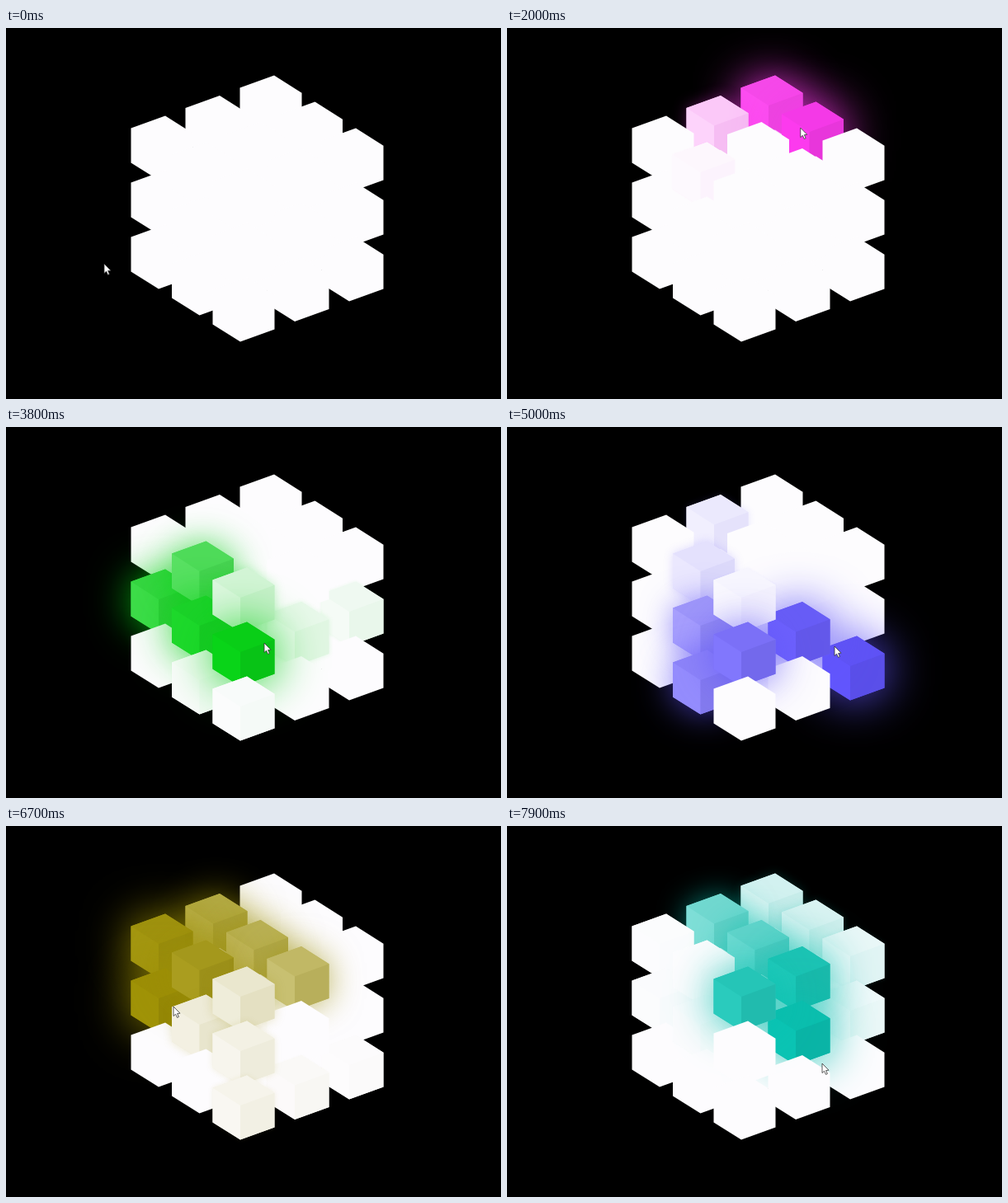
An HTML page with a canvas for the animation above (8 s loop, 600 by 450 pixels).

```html
<!DOCTYPE html>
<html lang="en">
<head>
<meta charset="utf-8">
<title>Glowing cubes</title>
<style>
  html, body { margin: 0; width: 100%; height: 100%; overflow: hidden; background: #000; }
  canvas { display: block; width: 600px; height: 450px; }
</style>
</head>
<body>
<canvas id="stage" width="600" height="450"></canvas>
<script>
const ctx = document.getElementById('stage').getContext('2d');
const LOOP = 8000, STEP = 100, FADE = 1500, GLOW = 58;
const WHITE = [253, 252, 254];

// Pointer stops: time of leaving, cube under the pointer, optional exact position.
const stops = [
  [0, '', 119, 286], [300, '', 142, 232], [430, '001'], [890, '100'],
  [1200, '010', 284, 113], [1400, '010', 289, 108], [1870, '020'], [2050, '120'],
  [2120, '210'], [2180, '211'], [2350, '212'], [2640, '202'], [2680, '102'],
  [2720, '201'], [2760, '211'], [2800, '221', 434, 240], [2820, '221'],
  [2900, '211'], [3080, '200'], [3525, '100'], [3590, '001'], [3680, '101'],
  [3800, '201', 313, 262], [3860, '201'], [3940, '200'],
  [4170, '010'], [4260, '100'], [4660, '101'], [4725, '102'], [4800, '201'],
  [4900, '211'], [5000, '222', 397, 266], [5450, '222'], [5600, '212'],
  [5780, '202'], [5850, '201'], [5950, '101'], [6010, '200'], [6370, '210'],
  [6410, '110'], [6450, '010'], [6570, '100'], [6630, '000'],
  [6700, '001', 203, 219], [6730, '101'], [6770, '200'], [6810, '211'],
  [6900, '221'], [7000, '220'], [7130, '120'], [7180, '020'], [7540, '010'],
  [7580, '110'], [7740, '200'], [7770, '210'], [7870, '211'],
  [7900, '', 382, 288], [8000, '212']
];

// Lightness of the glow colour around the hue circle.
const lightness = [[0, .54], [24, .45], [54, .32], [128, .43], [175, .39],
                   [224, .59], [246, .655], [300, .6], [360, .54]];

// Top vertex of cube (i, j, k): i to the front right, j to the back right, k down.
const apex = (i, j, k) => [193 + 49.5 * i + 66 * j, 107 + 32 * i - 24.5 * j + 66 * k];

const cubes = [];
for (let i = 0; i < 3; i++)
  for (let j = 2; j >= 0; j--)
    for (let k = 0; k < 3; k++)
      cubes.push({ id: `${i}${j}${k}`, at: apex(i, j, k) });

const path = stops.map(([t, id, x, y]) => {
  if (x === undefined) {
    const [ax, ay] = apex(...[...id].map(Number));
    x = ax - 5;
    y = ay + 40;
  }
  return { t, id, x, y };
});

const lerp = (a, b, u) => a + (b - a) * u;

function ease(x) {
  if (x >= 1) return 1;
  const bez = (p, q, s) => 3 * p * s * (1 - s) ** 2 + 3 * q * s * s * (1 - s) + s ** 3;
  let lo = 0, hi = 1;
  for (let n = 0; n < 16; n++) {
    const mid = (lo + hi) / 2;
    if (bez(.25, .25, mid) < x) lo = mid; else hi = mid;
  }
  return bez(.1, 1, lo);
}

function glowColor(t) {
  const hue = (104 + t * .1001) % 360;
  const n = lightness.findIndex(p => p[0] > hue);
  const [h0, l0] = lightness[n - 1], [h1, l1] = lightness[n];
  const l = lerp(l0, l1, (hue - h0) / (h1 - h0));
  const a = .92 * Math.min(l, 1 - l);
  return [0, 8, 4].map(c => {
    const m = (c + hue / 30) % 12;
    return 255 * (l - a * Math.max(-1, Math.min(m - 3, 9 - m, 1)));
  });
}

// How strongly a cube is lit: full under the pointer, then fading out.
function heat(id, t) {
  for (let n = path.length - 1; n > 0; n--) {
    const from = path[n - 1].t;
    if (path[n].id === id && from < t)
      return 1 - ease(Math.max(0, t - path[n].t) / FADE);
  }
  return 0;
}

function polygon(x, y, points, fill) {
  ctx.beginPath();
  for (const [px, py] of points) ctx.lineTo(x + px, y + py);
  ctx.closePath();
  ctx.fillStyle = fill;
  ctx.fill();
}

const T = [0, -.5], L = [-41.5, 14.6], C = [-8, 36], R = [33.5, 20.7];
const LB = [-41.5, 56.4], B = [-8, 77.6], RB = [33.5, 62.4];
const outline = [T, R, RB, B, LB, L];

// A higher power makes a face fade to white sooner.
const faces = [
  { points: [T, R, C, L], shade: .99, power: 1.15 },
  { points: [L, C, B, LB], shade: 1.02, power: 1.35 },
  { points: [C, R, RB, B], shade: .94, power: 1 }
];

function drawCube({ id, at: [x, y] }, t, glow) {
  const w = heat(id, t);
  const tint = (shade, power) =>
    `rgb(${WHITE.map((v, c) => Math.round(lerp(v, Math.min(255, glow[c] * shade), w ** power)))})`;
  if (w > .004) {
    ctx.shadowColor = `rgba(${glow.map(Math.round)},${w})`;
    ctx.shadowBlur = GLOW * w;
  }
  polygon(x, y, outline, tint(1, 1.15));
  ctx.shadowColor = 'transparent';
  ctx.shadowBlur = 0;
  if (w > .004)
    for (const f of faces) polygon(x, y, f.points, tint(f.shade, f.power));
}

const arrow = [[0, 0], [0, 11.5], [2.6, 9.2], [4.5, 13.4], [6.4, 12.5], [4.6, 8.5], [8, 8.2]];

function drawPointer(t) {
  const n = Math.max(1, path.findIndex(p => p.t >= t));
  const a = path[n - 1], b = path[n];
  const u = (t - a.t) / (b.t - a.t);
  polygon(lerp(a.x, b.x, u), lerp(a.y, b.y, u), arrow, '#fff');
  ctx.strokeStyle = '#333';
  ctx.lineWidth = .8;
  ctx.stroke();
}

function draw(t) {
  ctx.fillStyle = '#000';
  ctx.fillRect(0, 0, 600, 450);
  const glow = glowColor(t);
  for (const cube of cubes) drawCube(cube, t, glow);
  drawPointer(t);
}

const start = performance.now();
function tick() {
  const t = (performance.now() - start) % LOOP;
  draw(Math.floor(t / STEP) * STEP);
  requestAnimationFrame(tick);
}
tick();
</script>
</body>
</html>
```
